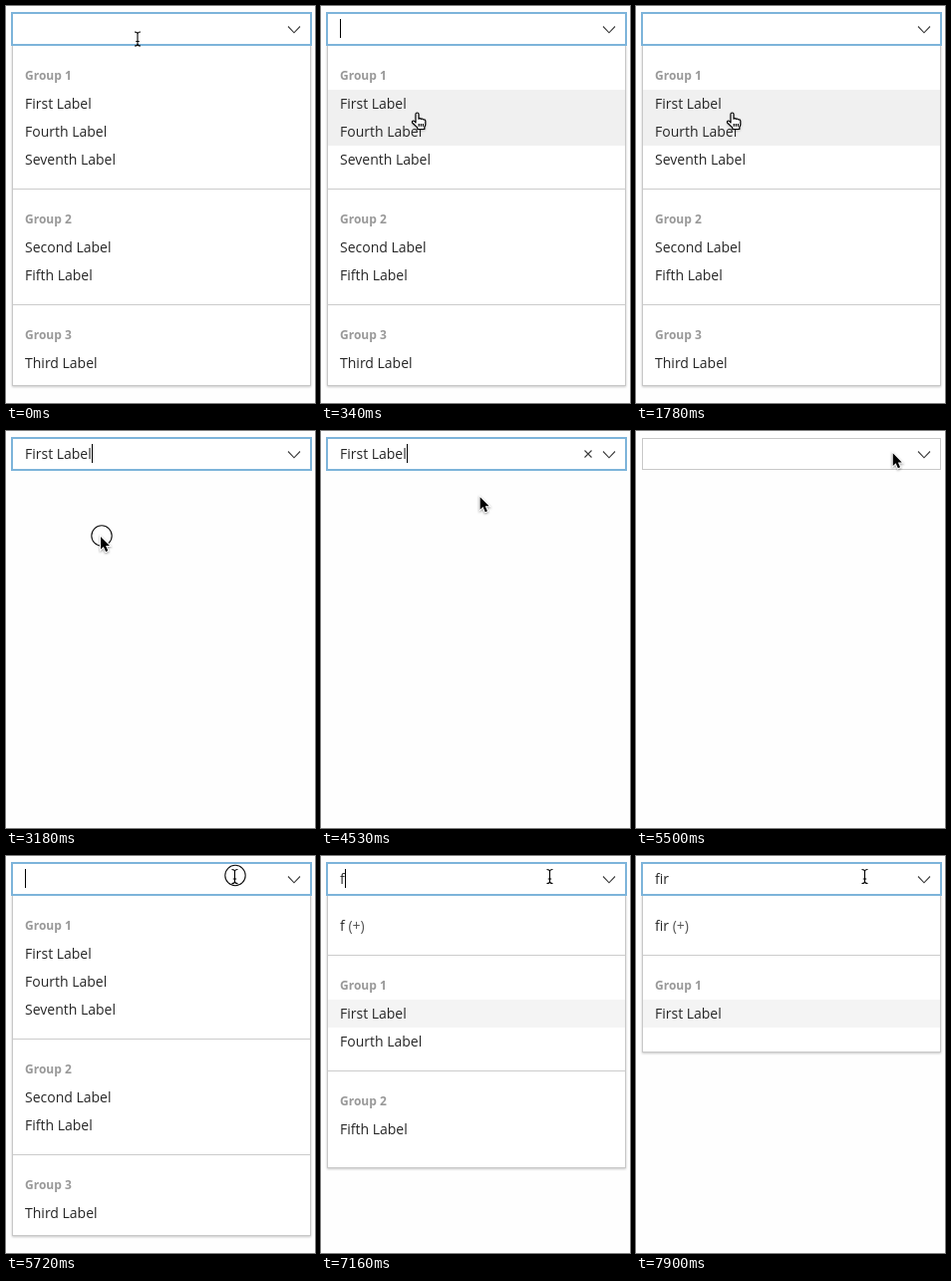
An HTML page that plays this animation: 310x398 px, repeating every 8 s.

```html
<!DOCTYPE html>
<html lang="en">
<head>
<meta charset="utf-8">
<title>Grouped combo box</title>
<style>
  html, body { margin: 0; width: 100%; height: 100%; overflow: hidden; background: #fefefe; }
  svg { display: block; }
  text { font: 14px "Open Sans", sans-serif; fill: #262626; white-space: pre; }
  .head { font-size: 12px; font-weight: 700; fill: #999; }
  .hint { fill: #555; }
  .panel { fill: #fff; stroke: #c8c8c8; filter: drop-shadow(0 1px 1px rgba(0, 0, 0, .22)); }
  .rule { fill: #ccc; }
  .icon { fill: none; stroke: #3a3a3a; stroke-width: 1.1; }
  .arrow { fill: #000; stroke: #fff; paint-order: stroke; stroke-width: 2; filter: drop-shadow(0 1px 1px rgba(0, 0, 0, .4)); }
  .hand { fill: #fff; stroke: #000; stroke-width: 1.2; stroke-linejoin: round; filter: drop-shadow(0 1px 1px rgba(0, 0, 0, .25)); }
  .beam { fill: none; stroke: #000; stroke-width: 1.1; }
  .ring { fill: none; stroke: #111; stroke-width: 1.1; }
</style>
</head>
<body>
<svg id="stage" width="310" height="398" viewBox="0 0 310 398">
  <g id="popups"></g>
  <rect id="field" fill="#fff"/>
  <text id="value" x="19" y="28"></text>
  <rect id="caret" y="13" width="1" height="19"/>
  <path id="clear" class="icon" d="M264.5 19.5l7 7m0-7l-7 7"/>
  <path class="icon" d="M283 20.5l6 6.3 6-6.3"/>
  <circle id="ring" class="ring" r="10.2"/>
  <g id="pointer">
    <path id="arrow" class="arrow" d="M0 0V12.6L2.9 9.9 5.1 15 7.3 14 5.1 9.1H9z"/>
    <path id="hand" class="hand" d="M0 11V2.5a1.5 1.5 0 0 1 3 0V7.2q1.2-1.2 2.4.2q1.2-1 2.4.6q1.8-.6 2 1.4v3q0 1.5-1 3v2.1H1.8v-1.6L-3.2 11.2q-1-1.8.8-2.2q1.4.3 2.4 2zM3.2 12v2.8m2.1-2.8v2.8m2.1-2.8v2.8"/>
    <path id="beam" class="beam" d="M-3-7Q0-7 0-5Q0-7 3-7M0-5.5V5.5M-3 7Q0 7 0 5Q0 7 3 7M-1.7 2.5h3.4"/>
  </g>
</svg>
<script>
const LOOP = 8000;
const $ = id => document.getElementById(id);

function add(parent, tag, attrs, content = '') {
  const node = document.createElementNS('http://www.w3.org/2000/svg', tag);
  for (const key in attrs) node.setAttribute(key, attrs[key]);
  node.textContent = content;
  return parent.appendChild(node);
}

const set = (node, attrs) => { for (const key in attrs) node.setAttribute(key, attrs[key]); };
const show = (node, on) => { node.style.display = on ? '' : 'none'; };

// Stacks the optional query row and the groups, then sizes the panel to fit.
function buildPopup(groups, query) {
  const popup = add($('popups'), 'g', {});
  const panel = add(popup, 'rect', { class: 'panel', x: 6.5, y: 39.5, width: 299 });
  const rule = y => add(popup, 'rect', { class: 'rule', x: 7, y, width: 298, height: 1 });
  const rows = [];
  let top = 40;
  if (query) {
    const line = add(popup, 'text', { x: 19, y: 75 }, query);
    const hint = add(line, 'tspan', { class: 'hint' }, ' (+)');
    rule(99);
    top = 100;
  }
  let end = top;
  groups.forEach(([title, ...items], i) => {
    if (i) {
      rule(end + 15);
      top = end + 16;
    }
    add(popup, 'text', { class: 'head', x: 19, y: top + 34 }, title);
    items.forEach((item, k) => {
      const y = top + 44 + k * 28;
      rows.push(add(popup, 'rect', { x: 7, y, width: 298, height: 28, fill: 'none' }));
      add(popup, 'text', { x: 19, y: y + 19 }, item);
    });
    end = top + 44 + items.length * 28;
  });
  const bottom = query ? end + 24 : 380;
  set(panel, { height: bottom - 39 });
  if (query) rows[0].setAttribute('fill', '#f4f4f4');
  return { popup, rows };
}

const full = buildPopup([
  ['Group 1', 'First Label', 'Fourth Label', 'Seventh Label'],
  ['Group 2', 'Second Label', 'Fifth Label'],
  ['Group 3', 'Third Label']
]);
const popups = {
  full: full.popup,
  f: buildPopup([['Group 1', 'First Label', 'Fourth Label'], ['Group 2', 'Fifth Label']], 'f').popup,
  fi: buildPopup([['Group 1', 'First Label'], ['Group 2', 'Fifth Label']], 'fi').popup,
  fir: buildPopup([['Group 1', 'First Label']], 'fir').popup
};

// start, field value, caret x, open popup, focused
const states = [
  [0, '', 19, 'full', true],
  [3180, 'First Label', 86, '', true],
  [5060, '', 19, '', false],
  [5690, '', 19, 'full', true],
  [7160, 'f', 24, 'f', true],
  [7270, 'fi', 27, 'fi', true],
  [7420, 'fir', 33, 'fir', true]
];

const caretOn = [[250, 760], [1270, 1780], [2280, 2790], [3180, 3680], [4140, 4650], [5690, 6200], [6710, 7900]];

// start, end, x, y
const clicks = [[3180, 3260, 96, 105], [5060, 5140, 271, 19], [5690, 5780, 230, 19.5]];

// start, end, steps, target x, target y, ease-out powers for x and y
const origin = [132, 33];
const moves = [
  [60, 340, 10, 95, 106, 1.5, 1.5],
  [3680, 3900, 9, 143, 79, 1.7, 1.7],
  [4530, 4910, 15, 272, 19, 2, 3.5],
  [5200, 5290, 3, 268, 23, 1.5, 1.5],
  [5500, 5660, 6, 229.5, 20.5, 1.7, 1.7]
];

const inside = ([from, to], t) => t >= from && t < to;

function pointerAt(t) {
  let [x, y] = origin;
  for (const [start, end, steps, toX, toY, powX, powY] of moves) {
    if (t < start) break;
    const step = Math.min(steps, Math.floor((t - start) / (end - start) * (steps - 1)) + 1);
    const left = 1 - step / steps;
    x = toX + (x - toX) * left ** powX;
    y = toY + (y - toY) * left ** powY;
  }
  return [x, y];
}

function render(t) {
  const [, value, caretX, open, focused] = states.filter(s => s[0] <= t).pop();
  const [x, y] = pointerAt(t);
  const shape = y < 40 && x < 257 ? 'beam' : open && y > 84 ? 'hand' : 'arrow';

  $('value').textContent = value;
  set($('caret'), { x: caretX });
  show($('caret'), caretOn.some(span => inside(span, t)));
  show($('clear'), inside([3210, 5060], t));
  set($('field'), focused
    ? { x: 6, y: 7, width: 300, height: 32, stroke: '#7db4da', 'stroke-width': 2 }
    : { x: 6.5, y: 7.5, width: 299, height: 31, stroke: '#c8c8c8', 'stroke-width': 1 });

  for (const name in popups) show(popups[name], name === open);
  full.rows[0].setAttribute('fill', shape === 'hand' ? '#f0f0f0' : 'none');
  full.rows[1].setAttribute('fill', shape === 'hand' && t >= 340 ? '#f0f0f0' : 'none');

  const click = clicks.find(c => inside(c, t));
  show($('ring'), click);
  if (click) set($('ring'), { cx: click[2], cy: click[3] });

  for (const name of ['arrow', 'hand', 'beam']) show($(name), name === shape);
  set($('pointer'), { transform: `translate(${x} ${y})` });
}

const begin = performance.now();
function tick() {
  render((performance.now() - begin) % LOOP);
  requestAnimationFrame(tick);
}
tick();
</script>
</body>
</html>
```
